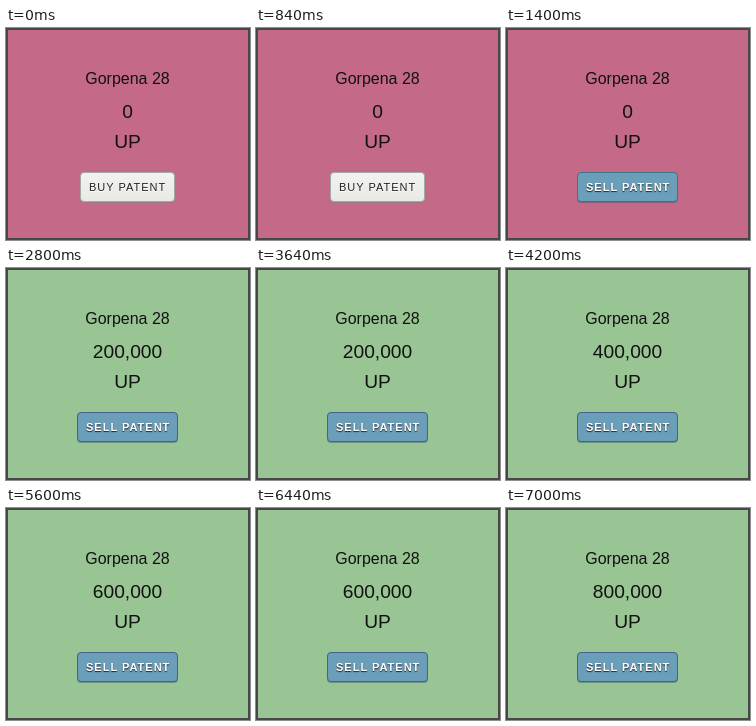
An HTML page that plays this animation: 244x212 px, repeating every 8 s.

```html
<!DOCTYPE html>
<html lang="en">
<head>
<meta charset="utf-8">
<title>Patent card</title>
<style>
html, body { margin: 0; width: 100%; height: 100%; overflow: hidden; }
svg { display: block; width: 244px; height: 212px; }
text { font-family: "Liberation Sans", Arial, sans-serif; fill: #111; }
.mid { text-anchor: middle; }
.big { font-size: 19.2px; }
.label { font-size: 11px; letter-spacing: 1px; }
#buy text { fill: #222; text-shadow: 0 1px 0 #fff; }
#sell text { fill: #fff; font-weight: bold; text-shadow: 0 1px 1px #222; }
</style>
</head>
<body>
<svg viewBox="0 0 244 212">
  <defs>
    <linearGradient id="light" x2="0" y2="1">
      <stop stop-color="#f2f2f0"/><stop offset="1" stop-color="#e9e9e6"/>
    </linearGradient>
  </defs>
  <rect width="244" height="212" fill="#484848"/>
  <rect id="card" x="2" y="2" width="240" height="208"/>
  <text class="mid" x="121.5" y="56" font-size="16">Gorpena 28</text>
  <text class="mid big" id="count" x="121.5" y="90"></text>
  <text class="mid big" x="121.5" y="120">UP</text>
  <g id="buy">
    <rect x="74" y="145" width="95" height="30" rx="4" fill="#8a7f82" opacity=".7"/>
    <rect x="74.5" y="144.5" width="94" height="29" rx="3.5" fill="url(#light)" stroke="#a3aaa3"/>
    <text class="label" x="83" y="163">BUY PATENT</text>
  </g>
  <g id="sell">
    <rect x="71" y="145" width="101" height="30" rx="4" fill="#3f5f70" opacity=".5"/>
    <rect id="edge" x="71.5" y="144.5" width="100" height="29" rx="3.5" fill="#6a9eb9"/>
    <text class="label" x="80" y="163">SELL PATENT</text>
  </g>
</svg>
<script>
const LOOP = 8000, STEP = 1400, GAIN = 200000;
const $ = id => document.getElementById(id);
const show = (id, on) => $(id).setAttribute("display", on ? "inline" : "none");

function draw(ms) {
  const step = Math.floor((ms % LOOP) / STEP);
  const owned = step >= 1;
  const earned = Math.max(0, step - 1) * GAIN;
  $("card").setAttribute("fill", earned ? "#98c593" : "#c46988");
  $("count").textContent = earned.toLocaleString("en-US");
  $("edge").setAttribute("stroke", earned ? "#416489" : "#3f7488");
  show("buy", !owned);
  show("sell", owned);
}

const start = performance.now();
function tick() {
  draw(performance.now() - start);
  requestAnimationFrame(tick);
}
tick();
</script>
</body>
</html>
```
